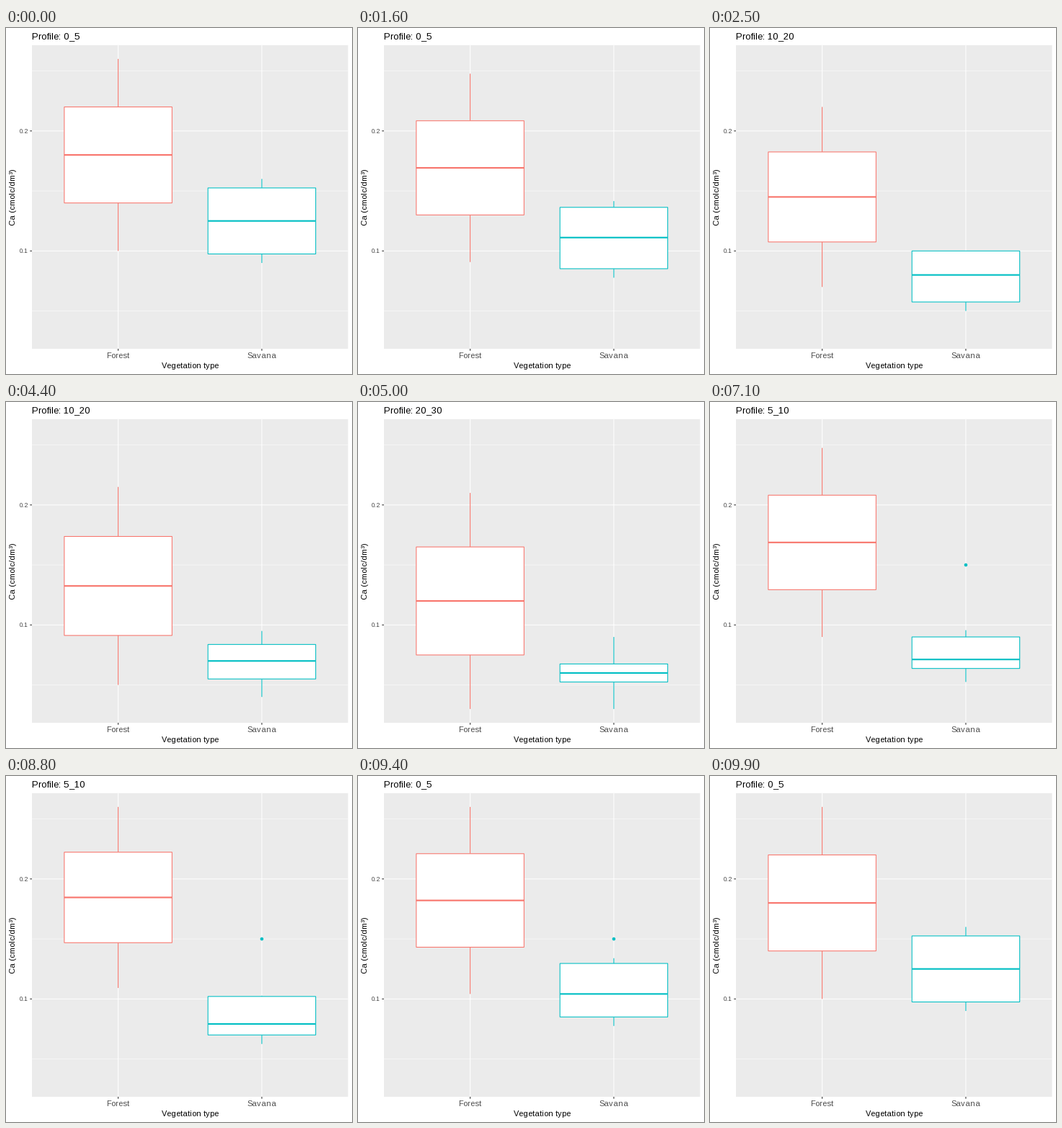
A matplotlib script for the animation above (10 s loop, 480 by 480 pixels).

```python
import matplotlib as mpl
import matplotlib.pyplot as plt
import numpy as np
from matplotlib.animation import FuncAnimation
from matplotlib.lines import Line2D
from matplotlib.patches import Circle, Rectangle

# Hinted, unkerned glyph advances
mpl.rcParams.update({
    "font.family": "Liberation Sans",
    "text.hinting_factor": 1,
    "text.kerning_factor": 6,
})

SIZE, DPI = 480, 72
LEFT, RIGHT, TOP, BOTTOM = 36.0, 474.5, 23.8, 445.0
UNIT = (RIGHT - LEFT) / 2.2
THIN, LINE, BOLD = 0.53, 1.07, 2.13
COLORS = ("#F8766D", "#00BFC4")
GROUPS = ("Forest", "Savana")
OUTLIER = 0.15

# Per profile and group: lower whisker, quartiles, upper whisker
STATES = [
    ("0_5", [[.10, .14, .18, .22, .26], [.09, .0975, .125, .1525, .16]]),
    ("10_20", [[.07, .1075, .145, .1825, .22], [.05, .0575, .08, .10, .10]]),
    ("20_30", [[.03, .075, .12, .165, .21], [.03, .0525, .06, .0675, .09]]),
    ("5_10", [[.11, .1475, .185, .2225, .26],
              [.06, .0675, .075, .0975, .0975]]),
]
NAMES = [name for name, _ in STATES]
STATS = np.array([stats for _, stats in STATES])
# First and last frame of each transition
MOVES = [(12, 25), (38, 50), (62, 74), (87, 99)]


def px(group):
    return LEFT + (group + 0.6) * UNIT


def py(value):
    return 309.3 - 1665 * (value - 0.1)


fig = plt.figure(figsize=(SIZE / DPI, SIZE / DPI), dpi=DPI, facecolor="white")
ax = fig.add_axes([0, 0, 1, 1])
ax.set(xlim=(0, SIZE), ylim=(SIZE, 0))
ax.axis("off")


def line(x0, y0, x1, y1, color, width, z):
    item = Line2D([x0, x1], [y0, y1], color=color, lw=width, zorder=z,
                  solid_capstyle="butt", snap=False)
    return ax.add_line(item)


def label(x, y, text, size, color="black", ha="center", **kw):
    return ax.text(x, y, text, fontsize=size, color=color, ha=ha,
                   va="baseline", **kw)


def draw_panel():
    ax.add_patch(Rectangle((LEFT, TOP), RIGHT - LEFT, BOTTOM - TOP,
                           fc="#EBEBEB", ec="none", snap=False, zorder=0))
    for v in (0.05, 0.15, 0.25):
        line(LEFT, py(v), RIGHT, py(v), "white", THIN, 1)
    for v in (0.1, 0.2):
        y = py(v)
        line(LEFT, y, RIGHT, y, "white", LINE, 1)
        line(LEFT - 2.75, y, LEFT, y, "#333333", LINE, 1)
        label(31, y + 3.2, f"{v:.1f}", 8.8, "#4D4D4D", ha="right")
    for g, name in enumerate(GROUPS):
        x = px(g)
        line(x, TOP, x, BOTTOM, "white", LINE, 1)
        line(x, BOTTOM, x, BOTTOM + 2.75, "#333333", LINE, 1)
        label(x, 458, name, 11, "#4D4D4D")
    label((LEFT + RIGHT) / 2, 472, "Vegetation type", 11)
    ax.text(13, (TOP + BOTTOM) / 2, "Ca (cmolc/dm³)", fontsize=11,
            rotation=90, rotation_mode="anchor", ha="center", va="baseline")


class Box:
    def __init__(self, group):
        x, color = px(group), COLORS[group]
        half = 0.375 * UNIT
        self.low = line(x, 0, x, 0, color, LINE, 2)
        self.high = line(x, 0, x, 0, color, LINE, 2)
        self.body = ax.add_patch(Rectangle(
            (x - half, 0), 2 * half, 0, fc="white", ec=color, lw=LINE,
            joinstyle="miter", snap=False, zorder=3))
        self.mid = line(x - half, 0, x + half, 0, color, BOLD, 4)

    def set(self, stats):
        lo, q1, med, q3, hi = py(stats)
        self.low.set_ydata([q1, lo])
        self.high.set_ydata([q3, hi])
        self.body.set_y(q3)
        self.body.set_height(q1 - q3)
        self.mid.set_ydata([med, med])


draw_panel()
title = label(LEFT, 15, "", 13.2, ha="left")
boxes = [Box(0), Box(1)]
dot = ax.add_patch(Circle((px(1), py(OUTLIER)), 2.3, fc=COLORS[1], ec="none",
                          snap=False, zorder=2))


def pose(i):
    """Current profile index and progress towards the next one."""
    for k, (start, end) in enumerate(MOVES):
        if i < end:
            return k, max(0, i - start) / (end - start)
    return 0, 0


def update(i):
    k, t = pose(i)
    nxt = (k + 1) % len(STATES)
    stats = STATS[k] * (1 - t) + STATS[nxt] * t
    for box, values in zip(boxes, stats):
        box.set(values)
    title.set_text("Profile: " + NAMES[nxt if t > 0.5 else k])
    dot.set_visible(k == 3 or (k == 2 and t > 0))
    return []


anim = FuncAnimation(fig, update, frames=100, interval=100, repeat=True,
                     repeat_delay=0, blit=False)
plt.show()
```
